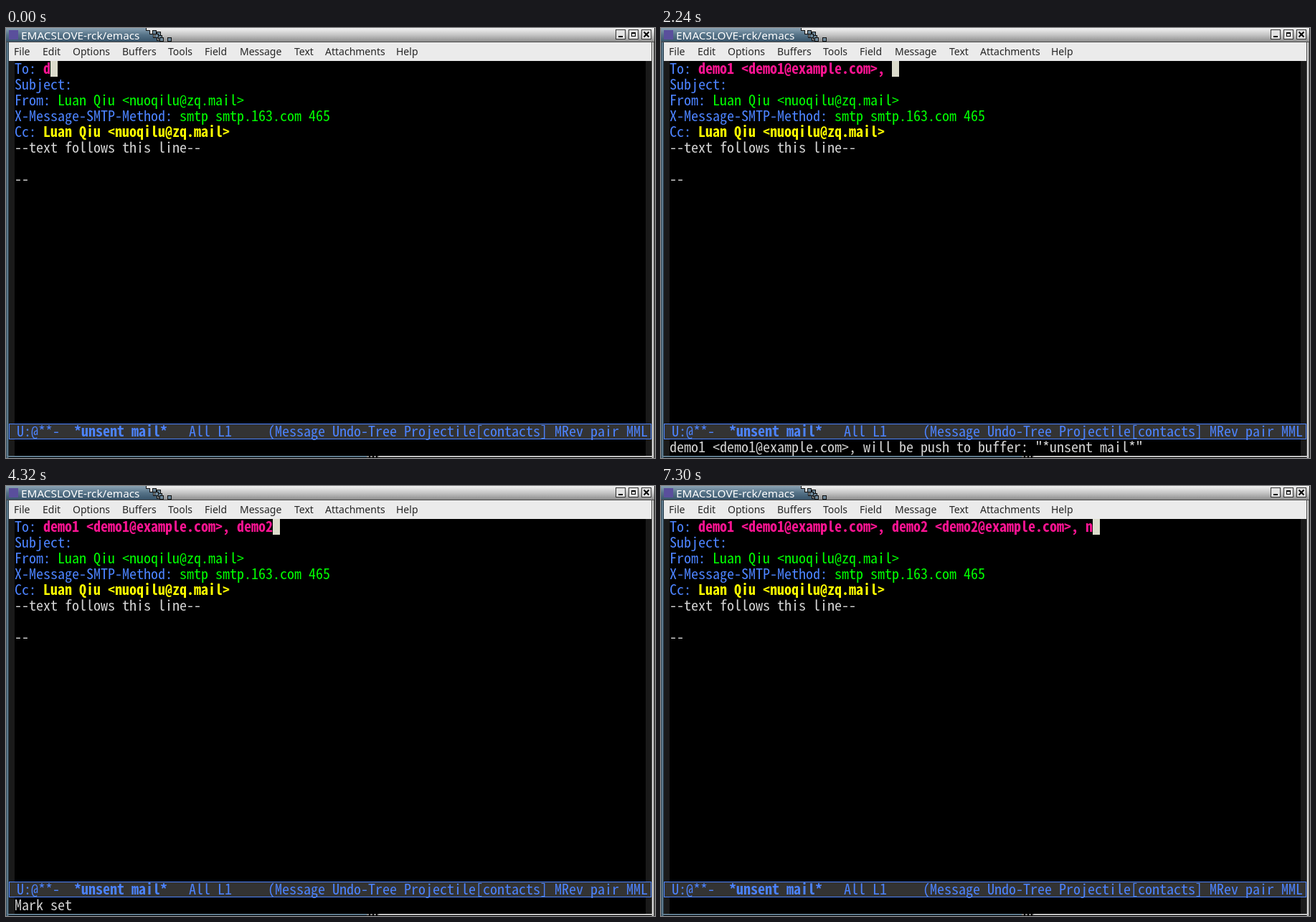
Animation, 905 px wide and 600 px high, one loop 8000 ms. Source, as an HTML page:

```html
<!DOCTYPE html>
<html lang="en">
<head>
<meta charset="utf-8">
<title>Mail contacts</title>
<style>
  html, body { margin: 0; width: 100%; height: 100%; overflow: hidden; background: #000; }
  svg { display: block; width: 905px; height: 600px; }
  text { white-space: pre; font-variant-ligatures: none; }
  .ui { font-family: "Noto Sans", "Open Sans", sans-serif; font-size: 14px; fill: #262626; }
  .mono { font-family: "Noto Sans Mono CJK SC", "Noto Sans Mono CJK JP", "Noto Sans Mono", monospace; font-kerning: none; }
</style>
</head>
<body>
<svg viewBox="0 0 905 600" xmlns="http://www.w3.org/2000/svg">
  <defs>
    <linearGradient id="blue" x2="0" y2="1">
      <stop offset="0" stop-color="#8ba3b4"/><stop offset=".5" stop-color="#567388"/><stop offset="1" stop-color="#38546a"/>
    </linearGradient>
    <linearGradient id="grey" x2="0" y2="1">
      <stop offset="0" stop-color="#f2f2f2"/><stop offset=".5" stop-color="#c6c6c6"/><stop offset="1" stop-color="#8e8e8e"/>
    </linearGradient>
    <clipPath id="inside"><rect x="4" y="46" width="896" height="551"/></clipPath>
  </defs>
  <rect width="905" height="600"/>

  <g id="frame" shape-rendering="crispEdges">
    <rect width="905" height="19" fill="url(#grey)"/>
    <path d="M0 0H195V3H200V8H205V13H210V17H215V19H0Z" fill="url(#blue)"/>
    <path d="M195.5 0V3.5H200.5V8.5H205.5V13.5H210.5V17.5H215.5V19" fill="none" stroke="#111"/>
    <rect y="19" width="905" height="1" fill="#4a4a4a"/>
    <rect x="4" y="3" width="13" height="13" fill="#5a4f9c"/>
    <path d="M.5 20V600" stroke="#2b414f"/>
    <path d="M1.5 20V600" stroke="#6f8b9d"/>
    <path d="M2.5 20V600" stroke="#4d697d"/>
    <path d="M3.5 20V600" stroke="#2f4554"/>
    <path d="M900.5 20V600" stroke="#444"/>
    <path d="M901.5 20V600" stroke="#e8e8e8"/>
    <path d="M902.5 20V600" stroke="#b8b8b8"/>
    <path d="M903.5 20V600" stroke="#7a7a7a"/>
    <path d="M904.5 0V600" stroke="#222"/>
    <path d="M1 597.5H503" stroke="#6f8b9d"/>
    <path d="M1 598.5H503" stroke="#4d697d"/>
    <path d="M520 597.5H903" stroke="#dcdcdc"/>
    <path d="M520 598.5H903" stroke="#a8a8a8"/>
    <path d="M503 598H520" stroke="#8e8e8e" stroke-width="2" stroke-dasharray="3 2"/>
    <rect x="4" y="20" width="896" height="26" fill="#ebebeb"/>
  </g>
  <text class="ui" x="21" y="16" style="font-size:15.3px;fill:#fff">EMACSLOVE-rck/emacs</text>
  <g id="menu"></g>

  <g shape-rendering="crispEdges">
    <path d="M4 46h8V552h-8zM892 46h8V552h-8zM4 574h8v23h-8zM892 574h8v23h-8z" fill="#1a1a1a"/>
    <rect x="4.5" y="552.5" width="895" height="21" fill="#333" stroke="#4c83ff"/>
  </g>
  <g id="screen" clip-path="url(#inside)"></g>
</svg>

<script>
const LOOP = 8000, COL = 10, ROW = 22, LEFT = 12, TOP = 46;
const C = { text: "#d3d3d3", blue: "#4c83ff", pink: "#ff1493", green: "#00ff00",
            yellow: "#ffff00", lime: "#d8fa3c", cursor: "#dcdccc" };
const NS = "http://www.w3.org/2000/svg";
const menu = document.getElementById("menu");
const screen = document.getElementById("screen");
const frame = document.getElementById("frame");

function add(parent, tag, attrs, content) {
  const el = document.createElementNS(NS, tag);
  for (const k in attrs) el.setAttribute(k, attrs[k]);
  if (content) el.textContent = content;
  parent.appendChild(el);
  return el;
}

const rect = (parent, x, y, width, height, fill, more) =>
  add(parent, "rect", { x, y, width, height, fill, ...more });

// Choose the size at which one column is COL pixels wide.
function fitMono() {
  const probe = add(screen, "text", { class: "mono" }, "0");
  const ctx = document.createElement("canvas").getContext("2d");
  ctx.font = "100px " + getComputedStyle(probe).fontFamily;
  return COL * 100 / ctx.measureText("0").width;
}
const monoSize = fitMono();

function write(x, y, str, fill, bold) {
  add(screen, "text", { class: "mono", x, y, fill, "font-size": monoSize,
    "font-weight": bold ? 700 : 400 }, str);
}
const put = (row, col, str, fill = C.text, bold = false) =>
  write(LEFT + col * COL, TOP + row * ROW + 18, str, fill, bold);
const cursor = (row, col) =>
  rect(screen, LEFT + col * COL, TOP + row * ROW, COL, ROW, C.cursor, { "shape-rendering": "crispEdges" });
const modeLine = (col, str, bold) => write(5 + col * COL, 570, str, C.blue, bold);
const echo = str => write(LEFT, 592, str, C.text);

function drawMenu(items) {
  for (const [x, label] of items) add(menu, "text", { class: "ui", x, y: 38 }, label);
}
const baseMenu = [[11, "File"], [51, "Edit"], [93, "Options"], [162, "Buffers"], [226, "Tools"]];
const mailMenu = [...baseMenu, [277, "Field"], [326, "Message"], [402, "Text"],
                  [445, "Attachments"], [544, "Help"]];
const cardMenu = [...baseMenu, [277, "BBDB"], [333, "Help"]];

const sender = "Luan Qiu <nuoqilu@zq.mail>";
const address = name => `${name} <${name}@example.com>, `;

function drawMail(to, message) {
  drawMenu(mailMenu);
  put(0, 0, "To:", C.blue);
  put(0, 4, to, C.pink, true);
  cursor(0, 4 + to.length);
  put(1, 0, "Subject:", C.blue);
  put(2, 0, "From:", C.blue);
  put(2, 6, sender, C.green);
  put(3, 0, "X-Message-SMTP-Method:", C.blue);
  put(3, 23, "smtp smtp.163.com 465", C.green);
  put(4, 0, "Cc:", C.blue);
  put(4, 4, sender, C.yellow, true);
  put(5, 0, "--text follows this line--");
  put(7, 0, "--");
  modeLine(1, "U:@**-");
  modeLine(9, "*unsent mail*", true);
  modeLine(25, "All L1     (Message Undo-Tree Projectile[contacts] MRev pair MML");
  if (message) echo(message);
}

function drawCard(name) {
  drawMenu(cardMenu);
  rect(screen, 4, 46, 896, 22, "#2b2b2b");
  rect(screen, 4, 67, 896, 1, "#1c1c1c");
  write(5, 64, "## Type `C-c C-c', `p' or `RET' to push email to buffer \"*unsent mail*\". ##", C.yellow);
  cursor(1, 0);
  put(1, 0, name[0], "#000");
  put(1, 1, name.slice(1), C.pink);
  put(2, 7, "phone (work):", C.lime);
  put(3, 15, "mail:", C.lime);
  put(3, 21, name + "@example.com");
  modeLine(1, "U:@---  *BBDB*");
  modeLine(17, "1/1/175");
  modeLine(36, "All L1     (BBDB Undo-Tree Projectile[contacts] MRev c");
  echo("Formatting BBDB...done.");
}

const one = "demo1", two = "demo2";
const first = address(one), both = first + address(two);
const pushed = name => address(name) + "will be push to buffer: \"*unsent mail*\"";
const mail = (at, to, message) => ({ at, draw: () => drawMail(to, message) });
const card = (at, name) => ({ at, draw: () => drawCard(name) });
const typing = (times, before, word) =>
  times.map((at, i) => mail(at, before + word.slice(0, i + 1)));

const steps = [
  ...typing([0, 150, 300, 450, 750], "", one),
  card(1340, one),
  mail(2240, first, pushed(one)),
  mail(2980, first + two[0], "Auto-saving...done"),
  ...typing([3130, 3430, 3570, 3870], first + two[0], two.slice(1)),
  mail(4320, first + two, "Mark set"),
  card(4460, two),
  mail(5360, both, pushed(two)),
  mail(7300, both + "n")
];

function drawFrame() {
  for (const [x, y] of [[204, 3], [210, 5], [207, 8], [212, 10], [214, 13], [225, 13]])
    rect(frame, x + .5, y + .5, 5, 5, "#6d8799", { stroke: "#111" });
  for (const x of [850, 868, 886])
    rect(frame, x + .5, 2.5, 13, 13, "#e2e2e2", { stroke: "#333" });
  rect(frame, 854, 11, 6, 2, "#000");
  rect(frame, 872.5, 6.5, 5, 5, "none", { stroke: "#000" });
  rect(frame, 872, 6, 6, 2, "#000");
  add(frame, "path", { d: "M889.5 5.5L896.5 12.5M896.5 5.5L889.5 12.5", stroke: "#000",
    "stroke-width": 2, "shape-rendering": "auto" });
}

let shown = null;
function render(t) {
  const step = steps.filter(s => s.at <= t).pop();
  if (step === shown) return;
  shown = step;
  menu.replaceChildren();
  screen.replaceChildren();
  step.draw();
}

drawFrame();
render(0);
const start = performance.now();
function tick() {
  render((performance.now() - start) % LOOP);
  requestAnimationFrame(tick);
}
requestAnimationFrame(tick);
</script>
</body>
</html>
```
